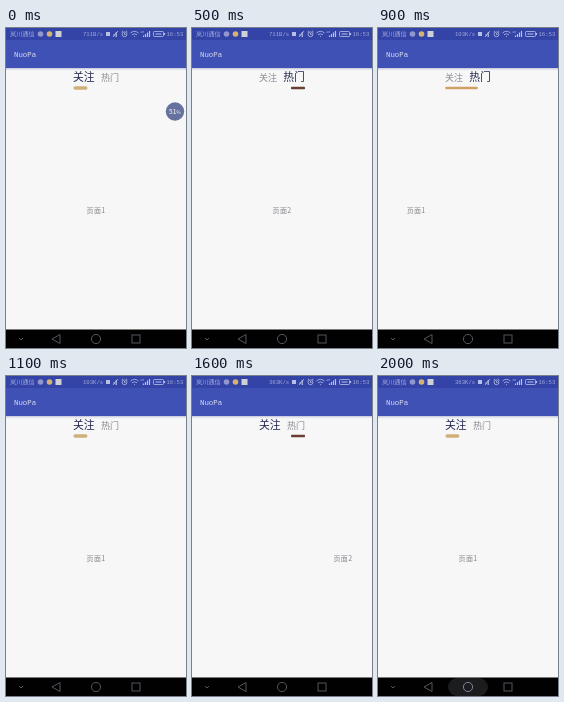
These frames come from a looping animation (180x320 px, 2100 ms). An HTML page:

```html
<!DOCTYPE html>
<html lang="zh">
<head>
<meta charset="utf-8">
<title>Tab pager</title>
<style>
  html, body { margin: 0; width: 100%; height: 100%; overflow: hidden; background: #f7f7f8; }
  svg { display: block; width: 100%; height: 100%; }
  text { font-family: "Noto Sans CJK SC", "Noto Sans CJK", sans-serif; }
  .mono { font-family: "Liberation Mono", monospace; }
  .status { fill: #a3abdb; font-size: 5.6px; }
  .line { fill: none; stroke: #b9c0e8; stroke-width: .8; }
  .nav { fill: none; stroke: #55565e; stroke-width: 1; }
  .page { fill: #84848b; font-size: 7px; font-weight: 300; letter-spacing: .3px; text-anchor: middle; }
</style>
</head>
<body>
<svg viewBox="0 0 180 320" preserveAspectRatio="none">
  <defs>
    <linearGradient id="shade" x2="0" y2="1">
      <stop stop-color="#8f96bd" stop-opacity=".55"/>
      <stop offset="1" stop-color="#d5d7e2" stop-opacity="0"/>
    </linearGradient>
  </defs>
  <rect width="180" height="320" fill="#f7f7f8"/>
  <rect width="180" height="40" fill="#3f51b5"/>
  <rect width="180" height="12" fill="#3343a6"/>
  <rect y="40" width="180" height="3" fill="url(#shade)"/>

  <text class="status" x="4" y="8.2" style="font-size:6.2px;font-weight:300">岚川通信</text>
  <circle cx="34.5" cy="6" r="2.8" fill="#8f97cc"/>
  <circle cx="43.5" cy="6" r="2.8" fill="#d5b273"/>
  <rect x="49.5" y="3" width="6" height="6" fill="#cfcfd6"/>
  <text class="status mono" id="speed" x="77" y="8"></text>
  <rect x="100" y="4" width="4" height="4" fill="#b9c0e8"/>
  <g class="line">
    <path d="M107 7h1.5l2-3v5l-2-2M107 9l5-6"/>
    <circle cx="118.5" cy="6.3" r="2.4"/>
    <path d="M118.5 5v1.5h1.2M115.6 4l1.4-1.2M121.4 4l-1.4-1.2"/>
    <path d="M124.5 5q4-3.4 8 0M126 6.8q2.5-2 5 0M128 8.6h1"/>
    <path d="M137.5 9v-1.5M139.5 9v-3M141.5 9v-4.5M143.5 9v-6" stroke-width="1.2"/>
    <rect x="147.5" y="3.5" width="10" height="5" rx=".8"/>
    <path d="M149.5 6h6M158.5 5v2" stroke-width="1.2"/>
  </g>
  <text class="status mono" x="134" y="5" style="font-size:3.5px">4G</text>
  <text class="status mono" x="160.5" y="8">16:53</text>
  <text class="mono" x="8" y="29.3" font-size="7.4" fill="#d9dcf2">NuoPa</text>

  <text id="tab0" x="67">关注</text>
  <text id="tab1">热门</text>
  <rect id="bar"/>
  <text class="page" id="page0" y="185.4">页面1</text>
  <text class="page" id="page1" y="185.4">页面2</text>

  <g id="bubble">
    <circle cx="169" cy="83.5" r="9.2" fill="#65729f"/>
    <text x="168.8" y="86" text-anchor="middle" font-size="6.8" fill="#fff"><tspan id="load"></tspan><tspan font-size="4.5">%</tspan></text>
  </g>

  <rect y="301.5" width="180" height="18.5" fill="#010102"/>
  <rect id="press" x="70" y="302" width="40" height="18" rx="9" fill="#1b1c1d"/>
  <g class="nav">
    <path d="M13 310l2 2 2-2"/>
    <path d="M54 306.5v9l-8-4.5z"/>
    <circle id="home" cx="90" cy="311" r="4.6"/>
    <rect x="126" y="307" width="8" height="8"/>
  </g>
</svg>
<script>
const LOOP = 2100, STEP = 100, W = 180;
const $ = id => document.getElementById(id);
const set = (id, attrs) => {
  for (const k in attrs) $(id).setAttribute(k, attrs[k]);
};
const clamp = x => Math.min(1, Math.max(0, x));
const smooth = x => x * x * (3 - 2 * x);

// Page moves: start, end, direction
const moves = [[0, 470, 1], [600, 1065, -1], [1200, 1485, 1], [1500, 1756, -1]];
const position = t => moves.reduce((p, [a, b, dir]) => p + dir * smooth(clamp((t - a) / (b - a))), 0);

// Tab selection flips at each of these times
const flips = [300, 1000, 1300, 1600];
const selected = t => flips.filter(f => t >= f).length % 2;

const tan = [208, 176, 122], orange = [206, 152, 90], brown = [106, 62, 50];
const mix = (a, b, k) => `rgb(${a.map((v, i) => Math.round(v + (b[i] - v) * k))})`;
const barColor = p => p < .4 ? mix(tan, orange, p / .4) : mix(orange, brown, (p - .4) / .6);

function drawTabs(active) {
  [0, 1].forEach(i => {
    const on = i === active;
    set('tab' + i, {
      y: on ? 53.4 : 53.2,
      'font-size': on ? 10.8 : 9,
      'font-weight': on ? 500 : 300,
      fill: on ? '#23264f' : '#8b8b90'
    });
  });
  set('tab1', { x: active ? 91.3 : 95 });
}

function drawBar(p, moving) {
  const left = 67.4 + 31.6 * clamp(2 * p - 1);
  const right = 81.5 + 31.5 * clamp(2 * p);
  const h = moving ? 2.5 : 3.6;
  set('bar', { x: left, y: 60 - h / 2, width: right - left, height: h, rx: moving ? .7 : 1.8, fill: barColor(p) });
}

function draw(t) {
  const p = position(t);
  drawTabs(selected(t));
  // After a tap the bar trails the page by one step
  drawBar(clamp(position(t > 1200 ? t - STEP : t)), p > .001);
  set('page0', { x: W / 2 - W * p });
  set('page1', { x: W / 2 + W * (1 - p) });

  $('speed').textContent = t < 600 ? '711B/s' : t < 1500 ? '103K/s' : '363K/s';
  $('load').textContent = t < 200 ? 51 : 34;
  set('bubble', { opacity: t < 300 ? 1 : t < 400 ? .5 : 0 });

  const pressed = t >= 2000;
  set('press', { opacity: pressed ? 1 : 0 });
  set('home', { stroke: pressed ? '#7d829c' : '#55565e' });
}

const start = performance.now();
function tick() {
  const t = (performance.now() - start) % LOOP;
  draw(Math.floor(t / STEP) * STEP);
  requestAnimationFrame(tick);
}
tick();
</script>
</body>
</html>
```
